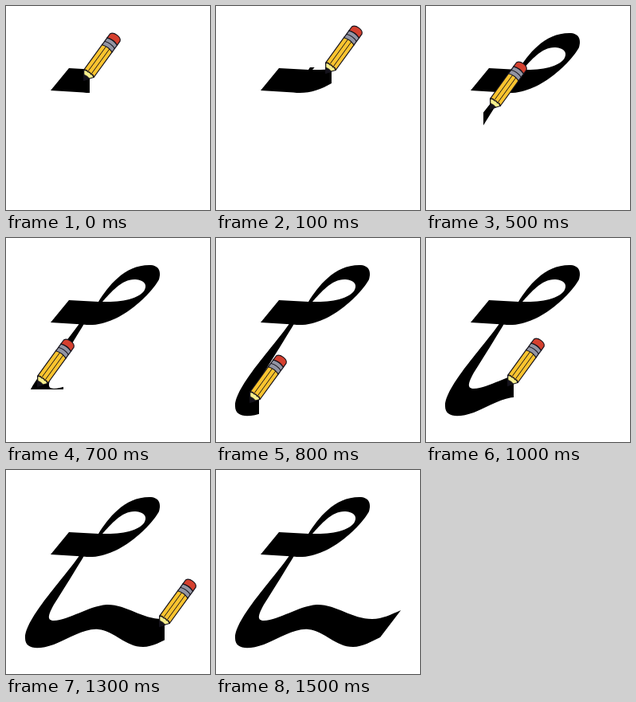
Recreate the animation shown at these times as an HTML page with a canvas. Size 256x256 px, loop 3.5 s.

```html
<!DOCTYPE html>
<html lang="en">
<head>
<meta charset="utf-8">
<title>Pencil lettering</title>
<style>
html, body { margin: 0; width: 100%; height: 100%; overflow: hidden; background: #fff; }
canvas { display: block; width: 100vw; height: 100vh; }
</style>
</head>
<body>
<canvas id="stage" width="256" height="256"></canvas>
<script>
const ctx = document.getElementById('stage').getContext('2d');
const LOOP = 3500, STEP = 100, LAST = 15;
const INK = '#15131c';

const ribbon = new Path2D(
  'M56 106 L79 78 L116 80 C128 61 148 34 180 34 C192 34 195 42 192 52' +
  'C184 68 140 115 97 108.5Z' +
  'M121 80 C132 68 145 52 161 52 C171 52 178 57 174 65 C169 75 148 81 121 80Z');
const stem = new Path2D(
  'M93 106 C72 137 24 186 24 211 C24 225 40 226 60 219 C80 211 100 198 116 200' +
  'C136 202 150 222 172 222 C184 222 195 215 206 210 L232 176' +
  'C220 181 209 187 196 187 C170 187 150 168 126 169 C103 171 80 188 60 189' +
  'C50 189 54 180 60 169 C72 150 87 126 99 106Z');

// Pencil point at each step
const nib = [
  [98, 93], [138, 84], [173, 63], [166, 44], [119, 83], [81, 129], [62, 156], [40, 186],
  [43, 206], [73, 195], [103, 185], [133, 186], [162, 197], [193, 196], [228, 180]
];

// Rectangles of each stroke already drawn
function ribbonAreas(n) {
  if (n > 3) return [[0, 0, 256, 256]];
  const areas = [[0, 77, n ? 145 : 105, 40]];
  if (n > 1) areas.push([145, 62, 111, 55]);
  if (n > 2) areas.push([161, 0, 95, 80]);
  return areas;
}

function stemAreas(n) {
  if (n < 4) return [];
  if (n < 8) return [[0, 0, 72, [109, 133, 163, 190][n - 4]], [72, 0, 184, 163]];
  if (n > 13) return [[0, 0, 256, 256]];
  const edge = [54, 80, 110, 140, 169, 199][n - 8];
  return [[0, 0, 256, 163], [0, 0, 72, 186], [0, 163, edge, 93]];
}

function fillWithin(path, areas) {
  ctx.save();
  ctx.beginPath();
  for (const area of areas) ctx.rect(...area);
  ctx.clip();
  ctx.fillStyle = '#000';
  ctx.fill(path, 'evenodd');
  ctx.restore();
}

function shape(d, fill, width = 1.2) {
  const path = new Path2D(d);
  if (fill) {
    ctx.fillStyle = fill;
    ctx.fill(path);
  }
  ctx.lineWidth = width;
  ctx.stroke(path);
}

// Drawn along the x axis with its point at the origin
function drawPencil([x, y]) {
  ctx.save();
  ctx.translate(x, y);
  ctx.rotate(-54 * Math.PI / 180);
  ctx.strokeStyle = INK;
  ctx.lineJoin = 'round';
  shape('M0 0 L10 -7.8 L14 0 L10 7.8Z', '#f7ef8c');
  shape('M10 -7.8 H50 Q53 0 50 7.8 H10 Q13 5 11 2.5 Q13 0 11 -2.5 Q13 -5 10 -7.8Z', '#fcc42f');
  shape('M12 -2.5 H51 M12 2.8 H51', null, 0.9);
  shape('M49 -7.8 H60 Q63 0 60 7.8 H49 Q52 0 49 -7.8Z', '#9294a3');
  shape('M54.5 -7.8 Q57.5 0 54.5 7.8', null, 1.1);
  shape('M60 -7.8 H66 Q70 -6.5 70 0 Q70 6.5 66 7.8 H60 Q63 0 60 -7.8Z', '#d5402f');
  shape('M-1 0 L5.5 -4.5 Q7 0 5.5 4.5Z', INK, 0.6);
  ctx.restore();
}

function render(time) {
  const n = Math.min(LAST, Math.floor((time % LOOP) / STEP));
  ctx.fillStyle = '#fff';
  ctx.fillRect(0, 0, 256, 256);
  fillWithin(ribbon, ribbonAreas(n));
  fillWithin(stem, stemAreas(n));
  if (n < LAST) drawPencil(nib[n]);
}

const start = performance.now();
function tick() {
  render(performance.now() - start);
  requestAnimationFrame(tick);
}
tick();
</script>
</body>
</html>
```
